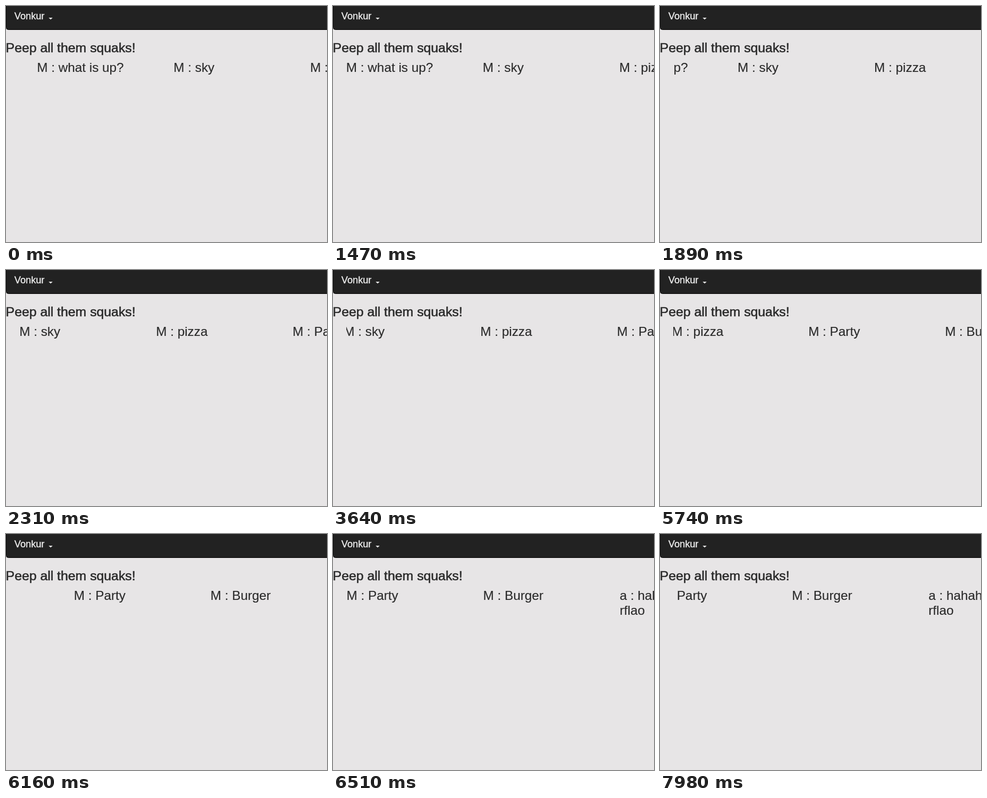
These frames come from a looping animation (604x444 px, 8 s). An HTML page:

```html
<!DOCTYPE html>
<html lang="en">
<head>
<meta charset="utf-8">
<style>
  html, body { margin: 0; width: 100%; height: 100%; overflow: hidden; background: #e7e5e6; }
  svg { display: block; width: 604px; height: 444px; }
  text { font-family: "Liberation Sans", Arial, sans-serif; fill: #2b2b2b; stroke: #2b2b2b; white-space: pre; }
  .brand { font-size: 18.2px; fill: #eee; stroke: #eee; stroke-width: .4px; }
  .title { font-size: 24.8px; stroke-width: .6px; }
  .slide { font-size: 24.3px; stroke-width: .15px; }
</style>
</head>
<body>
<svg viewBox="0 0 604 444">
  <defs>
    <clipPath id="view"><rect x="25" y="95" width="579" height="70"/></clipPath>
  </defs>
  <rect width="604" height="444" fill="#e7e5e6"/>
  <rect x=".5" y="-10" width="620" height="54.5" rx="4" fill="#222" stroke="#000"/>
  <text class="brand" x="15.8" y="25">Vonkur</text>
  <path d="M80.2 22h7.6l-3.8 3.6z" fill="#eee"/>
  <text class="title" x="-.4" y="87">Peep all them squaks!</text>
  <g clip-path="url(#view)"><g id="track"></g></g>
</svg>
<script>
  const LOOP = 8000, TICK = 70;
  const SLIDE_W = 257, LEFT = 25.2, BASE = 124, LINE = 28;
  const SPEED = 848;
  const STARTS = [-650, 1450, 3565, 5681, 7779];
  const SLIDES = [
    ["M : what is up?"], ["M : sky"], ["M : pizza"], ["M : Party"], ["M : Burger"],
    ["a : hahahahaha", "rflao"]
  ];
  const track = document.getElementById("track");

  SLIDES.forEach((lines, i) => lines.forEach((line, row) => {
    const el = document.createElementNS("http://www.w3.org/2000/svg", "text");
    el.setAttribute("class", "slide");
    el.setAttribute("x", LEFT + i * SLIDE_W);
    el.setAttribute("y", BASE + row * LINE);
    el.textContent = line;
    track.append(el);
  }));

  const clamp = v => Math.min(1, Math.max(0, v));
  const swing = p => 0.5 - Math.cos(p * Math.PI) / 2;

  // Each start advances the carousel by one slide.
  function render(ms) {
    const t = Math.floor((ms % LOOP) / TICK) * TICK;
    const index = STARTS.reduce((sum, s) => sum + swing(clamp((t - s) / SPEED)), -1);
    track.setAttribute("transform", `translate(${(-index * SLIDE_W).toFixed(2)} 0)`);
  }

  const began = performance.now();
  function frame() {
    render(performance.now() - began);
    requestAnimationFrame(frame);
  }
  frame();
</script>
</body>
</html>
```
